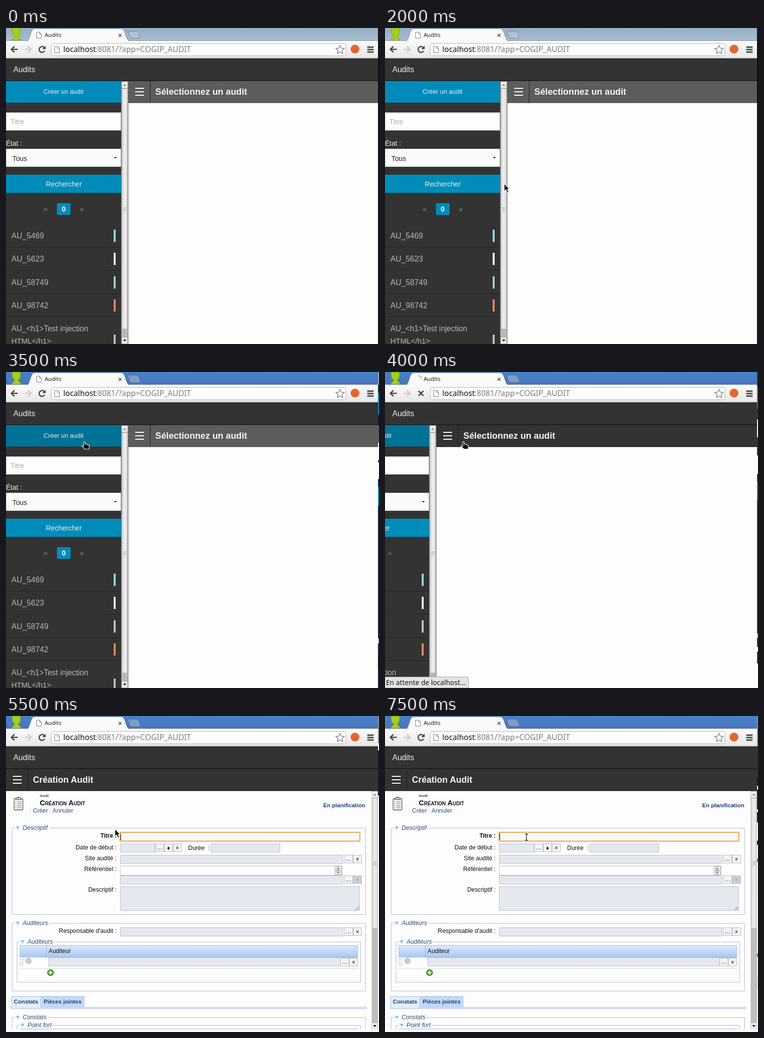
An HTML page that plays this animation: 762 px wide and 644 px high, repeating every 8 s.

```html
<!DOCTYPE html>
<html lang="fr">
<head>
<meta charset="utf-8">
<title>Audits</title>
<style>
html, body { margin: 0; width: 100%; height: 100%; overflow: hidden; background: #fdfdfd; }
svg { display: block; width: 762px; height: 644px; font-family: "Liberation Sans", Arial, sans-serif; }
text { white-space: pre; }
.ui { font-family: "Noto Sans", "Open Sans", sans-serif; }
.b { font-weight: bold; }
.i { font-style: italic; }
.e { text-anchor: end; }
.m { text-anchor: middle; }
.sc { font-variant: small-caps; }
</style>
</head>
<body>
<svg id="stage" viewBox="0 0 762 644">
  <defs>
    <linearGradient id="idle" x2="0" y2="1"><stop stop-color="#94afc6"/><stop offset="1" stop-color="#a9bfd0"/></linearGradient>
    <linearGradient id="active" x2="0" y2="1"><stop stop-color="#4583c8"/><stop offset="1" stop-color="#4a72bd"/></linearGradient>
    <linearGradient id="tool" x2="0" y2="1"><stop stop-color="#fafafa"/><stop offset="1" stop-color="#e8e8e8"/></linearGradient>
    <linearGradient id="bar"><stop stop-color="#cdcdcd"/><stop offset=".45" stop-color="#f0f0f0"/><stop offset="1" stop-color="#d8d8d8"/></linearGradient>
    <linearGradient id="th" x2="0" y2="1"><stop stop-color="#dce9fb"/><stop offset="1" stop-color="#a8c8f2"/></linearGradient>
    <clipPath id="page"><rect y="153" width="760" height="485.5"/></clipPath>
  </defs>
</svg>
<script>
const NS = 'http://www.w3.org/2000/svg';
const stage = document.getElementById('stage');
let into = stage;

function add(tag, attrs, text) {
  const el = document.createElementNS(NS, tag);
  for (const k in attrs) el.setAttribute(k, attrs[k]);
  if (text) el.textContent = text;
  into.append(el);
  return el;
}
const rect = (x, y, w, h, fill, more) => add('rect', { x, y, width: w, height: h, fill, ...more });
const box = (x, y, w, h, fill, stroke, more) =>
  rect(x + .5, y + .5, w - 1, h - 1, fill, { stroke, ...more });
const path = (d, fill = 'none', stroke = 'none', width = 1, more) =>
  add('path', { d, fill, stroke, 'stroke-width': width, ...more });
const disc = (cx, cy, r, fill, stroke = 'none') => add('circle', { cx, cy, r, fill, stroke });
const text = (x, y, str, size, fill, cls = '') =>
  add('text', { x, y, 'font-size': size, fill, class: cls }, str);
function group(draw, attrs) {
  const outer = into, g = add('g', attrs);
  into = g;
  draw();
  into = outer;
  return g;
}
const show = (el, on) => el.setAttribute('visibility', on ? 'visible' : 'hidden');
const move = (el, x, y) => el.setAttribute('transform', `translate(${x} ${y})`);

const DARK = '#333333', PAPER = '#fdfdfd', BLUE = '#008cba', PALE = '#ececec', SELECT = '#fafafa';
const FIELD = '#e5e8ee', LINE = '#b4b8d4', NAVY = '#1c3f78', ICON = '#484848', INK = '#111111';

rect(0, 0, 762, 644, PAPER);

// Page body and sidebar
let hoverButton, hoverSelect;
const sidebar = group(() => {
  rect(0, 108, 236, 536, DARK);
  hoverButton = rect(0, 108, 235, 44, BLUE);
  text(117.5, 134, 'Créer un audit', 12.9, PALE, 'm');
  box(0, 172, 235, 37, PAPER, '#cccccc');
  text(9, 196, 'Titre', 14.2, '#adadad');
  text(0, 240, 'État :', 14, '#f0f0f0');
  hoverSelect = box(0, 246, 235, 37, SELECT, '#cccccc');
  text(13, 271, 'Tous', 14.3, '#222222');
  path('M220.500 263h6l-3 3z', '#222222');
  rect(0, 299, 235, 37, BLUE);
  text(118, 323, 'Rechercher', 14.2, PALE, 'm');
  text(77, 374, '«', 14, '#858585');
  rect(104, 357, 28, 24, BLUE, { rx: 3 });
  text(118, 374, '0', 14, '#ffffff', 'b m');
  text(151, 374, '»', 14, '#858585');
  [['AU_5469', '#8fdaf0'], ['AU_5623', '#f0f0f0'], ['AU_58749', '#a9d2a9'], ['AU_98742', '#ee8558']]
    .forEach(([name, color], i) => {
      const y = Math.round(i * 47.4);
      text(11, 429 + y, name, 16, '#b8b8b8');
      rect(220, 411 + y, 4, 25, color);
      rect(0, 446 + y, 235, 1, '#222222');
    });
  text(11, 618, 'AU_<h1>Test injection', 15.7, '#b8b8b8');
  text(11, 643, 'HTML</h1>', 15.4, '#b8b8b8');
  rect(220, 625, 4, 19, '#a9d2a9');
  rect(235, 108, 15, 536, '#777777');
  box(236, 109, 13, 14, '#eeeeee', '#a9a9a9');
  path('M239 118h7l-3.500-4z', '#8d8d8d');
  box(236, 123, 13, 491, 'url(#bar)', '#a9a9a9');
  path('M240 366.500h5m-5 3h5m-5 3h5', 'none', '#9b9b9b');
  rect(236, 614, 13, 16, '#b8b8b8');
  box(236, 630, 13, 14, '#eeeeee', '#a9a9a9');
  path('M239 635h7l-3.500 4z', INK);
});

let headBack, pick, created;
const panel = group(() => {
  rect(0, 108, 762, 536, PAPER);
  headBack = rect(0, 108, 762, 45, DARK);
  rect(44, 108, 1, 45, '#1c1c1c');
  path('M14 123h18M14 130h18M14 137h18', 'none', '#ffffff', 2);
  pick = text(55, 136, 'Sélectionnez un audit', 18.25, '#f6f6f6', 'b');
  created = text(55, 136, 'Création Audit', 18, '#f6f6f6', 'b');
});

// Form
function button(x, y, label, off) {
  box(x, y, 18, 17, off ? '#cfcfd2' : '#f3f4f7', '#babcc6');
  text(x + 9, y + (label === '…' ? 12 : 13), label, 12, off ? '#999999' : INK, 'm');
}
function fieldset(x, y, w, h, title, textEnd) {
  path(`M${x + 7} ${y}.500H${x}.500V${y + h}.500H${x + w}.500V${y}.500H${textEnd + 2}`, 'none', LINE);
  path(`M${x + 8} ${y - 3}h8l-4 7z`, '#86c4e8');
  text(x + 22, y + 4, title, 12.3, '#2f4a72', 'i');
}
const label = (y, str, cls = '') => text(226, y, str, cls ? 12 : 12.3, INK, 'e ' + cls);
const field = (x, y, w, h) => box(x, y, w, h, FIELD, '#bcc0cc');

let caret;
const form = group(() => {
  box(16, 168, 19, 24, '#f6f6f6', '#555555', { rx: 2, 'stroke-width': 1.3 });
  box(20, 166, 11, 5, '#d0d0d0', '#555555');
  disc(25.5, 166, 1.5, '#555555');
  path('M19 175h2m2 0h9M19 179h2m2 0h9M19 183h2m2 0h9M19 187h2m2 0h9', 'none', '#666666', 1.2);
  text(69, 165, 'Audit', 8, INK, 'i');
  text(69, 182, 'Création Audit', 14.9, INK, 'b sc');
  rect(49, 186, 1, 14, '#dcdce4');
  rect(89, 186, 1, 14, '#dcdce4');
  text(55, 197, 'Créer', 12.3, '#2f5080');
  text(95, 197, 'Annuler', 12.3, '#2f5080');
  text(734, 186, 'En planification', 11.55, NAVY, 'b e');

  fieldset(12, 228, 722, 176, 'Descriptif', 86);
  label(248, 'Titre :', 'b');
  rect(233, 237, 490, 18, '#f6faff', { rx: 1, stroke: '#e5a844', 'stroke-width': 2 });
  caret = rect(234, 239, 1, 14, INK);
  label(272, 'Date de début :');
  field(233, 260, 72, 18);
  button(305, 260, '…');
  button(323, 260, '♦');
  button(341, 260, '×');
  text(372, 273, 'Durée  :', 12.3, INK);
  field(418, 260, 142, 18);
  label(294, 'Site audité :');
  field(233, 283, 456, 18);
  button(691, 283, '…');
  button(709, 283, '×');
  label(316, 'Référentiel :');
  box(233, 305, 454, 20, PAPER, '#bcc0cc');
  box(671, 306, 15, 9, '#ececec', '#acacac', { rx: 2 });
  box(671, 315, 15, 9, '#ececec', '#acacac', { rx: 2 });
  path('M675 312.500h7l-3.500-4zM675 317.500h7l-3.500 4z', '#858585');
  field(233, 325, 456, 18);
  button(691, 325, '…');
  button(709, 325, '×', true);
  label(358, 'Descriptif :');
  field(233, 347, 490, 50);
  path('M714 395l7-7m-3 7l3-3', 'none', '#666666');

  fieldset(12, 422, 722, 138, 'Auditeurs', 86);
  label(442, "Responsable d'audit :");
  field(233, 431, 456, 18);
  button(691, 431, '…');
  button(709, 431, '×');
  fieldset(22, 460, 702, 82, 'Auditeurs', 96);
  box(28, 467, 691, 25, 'url(#th)', '#a9bbd8');
  rect(82, 468, 1, 23, '#8fa9cc');
  text(87, 483, 'Auditeur', 12.2, INK);
  for (let n = 0; n < 8; n++) rect(29 + n % 2 * 4, 495 + (n >> 1) * 4, 2, 2, '#b8b8b8');
  disc(46, 499, 5.5, '#cccccc', '#aaaaaa');
  field(87, 492, 632, 18);
  button(683, 493, '…');
  button(701, 493, '×');
  rect(28, 514, 691, 1, '#d4d6de');
  disc(91, 523, 6.5, '#57a63f', '#3c842c');
  path('M87.500 523h7m-3.500-3.500v7', 'none', '#ffffff', 2);

  box(11, 571, 60, 23, '#e3eefc', '#a6bede');
  box(72, 571, 88, 23, '#c3daf7', '#a6bede');
  text(16, 586, 'Constats', 11.65, NAVY, 'b');
  text(77, 586, 'Pièces jointes', 11.6, NAVY, 'b');
  box(10, 593, 727, 4, '#dbe8f8', '#b0c6e4');
  rect(12, 592, 58, 2, '#e3eefc');
  fieldset(12, 614, 722, 50, 'Constats', 82);
  fieldset(22, 630, 702, 40, 'Point fort', 92);
  rect(28, 637, 691, 2, '#bccbe2');

  rect(747, 153, 13, 485, '#bebebe');
  box(747, 153, 13, 14, '#f0f0f0', '#bdbdbd');
  path('M750 162h7l-3.500-4z', '#8d8d8d');
  box(747, 167, 13, 266, 'url(#bar)', '#bdbdbd');
  path('M751 297.500h6m-6 3h6m-6 3h6', 'none', '#9b9b9b');
  box(747, 625, 13, 14, '#f0f0f0', '#bdbdbd');
  path('M750 630h7l-3.500 4z', INK);
}, { 'clip-path': 'url(#page)' });

// Browser frame
rect(0, 61, 762, 47, DARK);
rect(0, 107, 762, 1, '#0d0d0d');
text(15, 90, 'Audits', 16, '#eeeeee');
const titleBar = rect(0, 0, 762, 27, 'url(#idle)');
path('M12 24C13 20 18 20 18 16C13 14 13 10 12.500 0H29.500C30 10 29 13 25 16C25 20 30 20 31 24Q21 27 12 24Z', '#a4cf18', '#7a9d1c');
rect(0, 26, 762, 35, 'url(#tool)');
rect(0, 25, 762, 1, '#74859a');
rect(0, 61, 762, 1, '#a0a0a0');
path('M43 26.500C49 25 50 3 57 1.500H237C244 3 245 25 252 26.500Z', '#fafafa', '#72859a');
rect(44, 26, 207, 2, '#fafafa');
const newTab = path('M250 9Q250 7 252 7H267Q269 7 270 9L274 19Q274 21 272 21H257Q254 21 253 18Z', '#b0c2d0', '#72859a');
function sheet(x, y, h) {
  path(`M${x}.500 ${y}.500h6l4 4v${h - 4}h-10zM${x + 6}.500 ${y}.500v4h4`, '#ffffff', '#808080');
}
const tabIcon = group(() => sheet(62, 8, 12));
const spinner = path('M0-6.500A6.500 6.500 0 0 1 6.500 0', 'none', '#a9a9a9', 2);
text(79, 18, 'Audits', 11.5, '#181818', 'ui');
path('M230 12l6 6m0-6l-6 6', 'none', '#555555', 1.7);
path('M24 43.500H11m6-6l-6 6l6 6', 'none', ICON, 2.6);
path('M38 43.500h13m-6-6l6 6l-6 6', 'none', '#cdcdcd', 2.6);
const reload = group(() => {
  path('M78 39.500A6 6 0 1 0 79 46.500', 'none', ICON, 2.5);
  path('M81 36v7h-7z', ICON);
});
const stop = path('M68.500 38.500l10 10m0-10l-10 10', 'none', ICON, 2.8);
box(92, 31, 603, 26, PAPER, '#b5b5b5', { rx: 2 });
sheet(99, 37, 13);
text(117, 49, 'localhost', 15.8, INK, 'ui');
text(183, 49, ':8081/?app=COGIP_AUDIT', 15.95, '#7d7d7d', 'ui');
path('M682.500 35.500l2.500 5.700 6.200.6-4.700 4.100 1.400 6.100-5.400-3.200-5.400 3.200 1.400-6.100-4.700-4.100 6.200-.6z', '#ffffff', '#777777', 1.2);
disc(713, 43, 9, '#e3672c');
path('M738 39h13m-13 5h13m-13 5h13', 'none', ICON, 2.8);

const status = group(() => {
  path('M0 621.500H167Q170.500 621.500 170.500 625V644H0Z', '#e4e4e4', '#a5a5a5');
  text(2, 638, 'En attente de localhost...', 14.1, '#151515', 'ui');
});

// Sliver of the desktop beside the window
const edge = group(() => {});
const NIGHT = '#1b1738';
const edges = {
  black: [[0, 644, '#0c0c0c']],
  desk: [[0, 26, '#94afc6'], [26, 16, NIGHT], [42, 45, BLUE], [87, 20, NIGHT], [144, 36, PAPER], [180, 38, NIGHT],
    [184, 34, PAPER], [218, 426, NIGHT], [234, 38, BLUE], [543, 10, '#c8c8c8'], [580, 26, '#080808']],
  slide: [[0, 644, DARK], [30, 45, BLUE], [97, 36, PAPER], [170, 38, SELECT], [223, 37, BLUE],
    [533, 9, '#c8c8c8'], [560, 10, PAPER], [594, 50, PAPER]],
  blank: [[0, 26, '#4a72bd'], [26, 92, NIGHT], [92, 9, '#b9b9c8']],
  form: [[0, 56, '#9c8a94'], [56, 14, PAPER], [70, 92, NIGHT]],
  late: [[0, 62, '#9c8a94'], [125, 92, NIGHT], [142, 8, PAPER], [190, 6, PAPER], [254, 8, NIGHT], [291, 6, '#6575a5'],
    [484, 7, '#6575a5'], [530, 28, '#dfe4f2']]
};

// Pointers, each with its hot spot at 0,0
const RIM = '#f4f4f4';
const beam = 'M-3-6.500H-1L0-5.500 1-6.500H3M0-5V5.500M-3 6.500H-1L0 5.500 1 6.500H3';
const cursors = {
  arrow: group(() => path('M.5 0V16l3.500-3.500 2.500 6 3-1.300-2.500-5.700H11.500Z', INK, RIM, 1.2)),
  hand: group(() => path('M0 0C1-2 3-1 3 1V4Q5 3 6 5Q8 4 9 6Q11 5 11 8V14H2L-4 8Q-4 6-1 8L0 8Z', '#080808', RIM, 1.2)),
  busy: group(() => {
    path('M0 0V14L9 8Z', INK, RIM, .8);
    disc(9, 9, 6.5, '#4a4a4a', '#eeeeee');
    path('M9 5V13M5 9H13M6 6l6 6m0-6l-6 6', 'none', '#c8c8c8');
    disc(9, 9, 2, '#222222');
  }),
  beam: group(() => {
    path(beam, 'none', '#ffffff', 3);
    path(beam, 'none', INK, 1.3);
  })
};

// Each step changes only what it names and holds until the next
const steps = [
  { at: 0, left: 250, edge: 'black' },
  { at: 2000, cursor: ['arrow', 243, 317] },
  { at: 2500, cursor: ['arrow', 215, 280], edge: 'desk', overSelect: true },
  { at: 3000, cursor: ['hand', 159, 143], overSelect: false, overButton: true },
  { at: 3500, active: true },
  { at: 4000, left: 105, dark: true, loading: true, spin: 0, status: true, edge: 'slide' },
  { at: 4500, left: 0, cursor: ['hand', 155, 172], spin: 130, edge: 'blank' },
  { at: 5000, cursor: ['busy', 150, 205], spin: -65 },
  { at: 5500, loading: false, status: false, form: true, caret: true, cursor: ['arrow', 222, 230], edge: 'form' },
  { at: 6000, caret: false, cursor: ['beam', 290, 252] },
  { at: 6500, caret: true, cursor: ['beam', 289, 247], edge: 'late' },
  { at: 7000, caret: false },
  { at: 7500, caret: true }
];

function render(s) {
  move(sidebar, s.left - 250, 0);
  move(panel, s.left, 0);
  headBack.setAttribute('fill', s.dark ? DARK : '#5c5c5c');
  hoverButton.setAttribute('fill', s.overButton ? '#007295' : BLUE);
  hoverSelect.setAttribute('fill', s.overSelect ? '#f0f0f0' : SELECT);
  titleBar.setAttribute('fill', s.active ? 'url(#active)' : 'url(#idle)');
  newTab.setAttribute('fill', s.active ? '#7f9cc6' : '#b0c2d0');
  show(pick, !s.form);
  show(created, s.form);
  show(form, s.form);
  show(caret, s.form && s.caret);
  show(status, s.status);
  show(tabIcon, !s.loading);
  show(reload, !s.loading);
  show(stop, s.loading);
  show(spinner, s.loading);
  spinner.setAttribute('transform', `translate(68 14) rotate(${s.spin || 0})`);
  for (const k in cursors) show(cursors[k], s.cursor && s.cursor[0] === k);
  if (s.cursor) move(cursors[s.cursor[0]], s.cursor[1], s.cursor[2]);
  edge.replaceChildren();
  into = edge;
  for (const [y, h, color] of edges[s.edge]) rect(760, y, 2, h, color);
  into = stage;
}

const start = performance.now();
let last = -1;
function tick() {
  const t = (performance.now() - start) % 8000;
  const past = steps.filter(s => s.at <= t);
  if (past.length !== last) {
    last = past.length;
    render(Object.assign({}, ...past));
  }
  requestAnimationFrame(tick);
}
tick();
</script>
</body>
</html>
```
